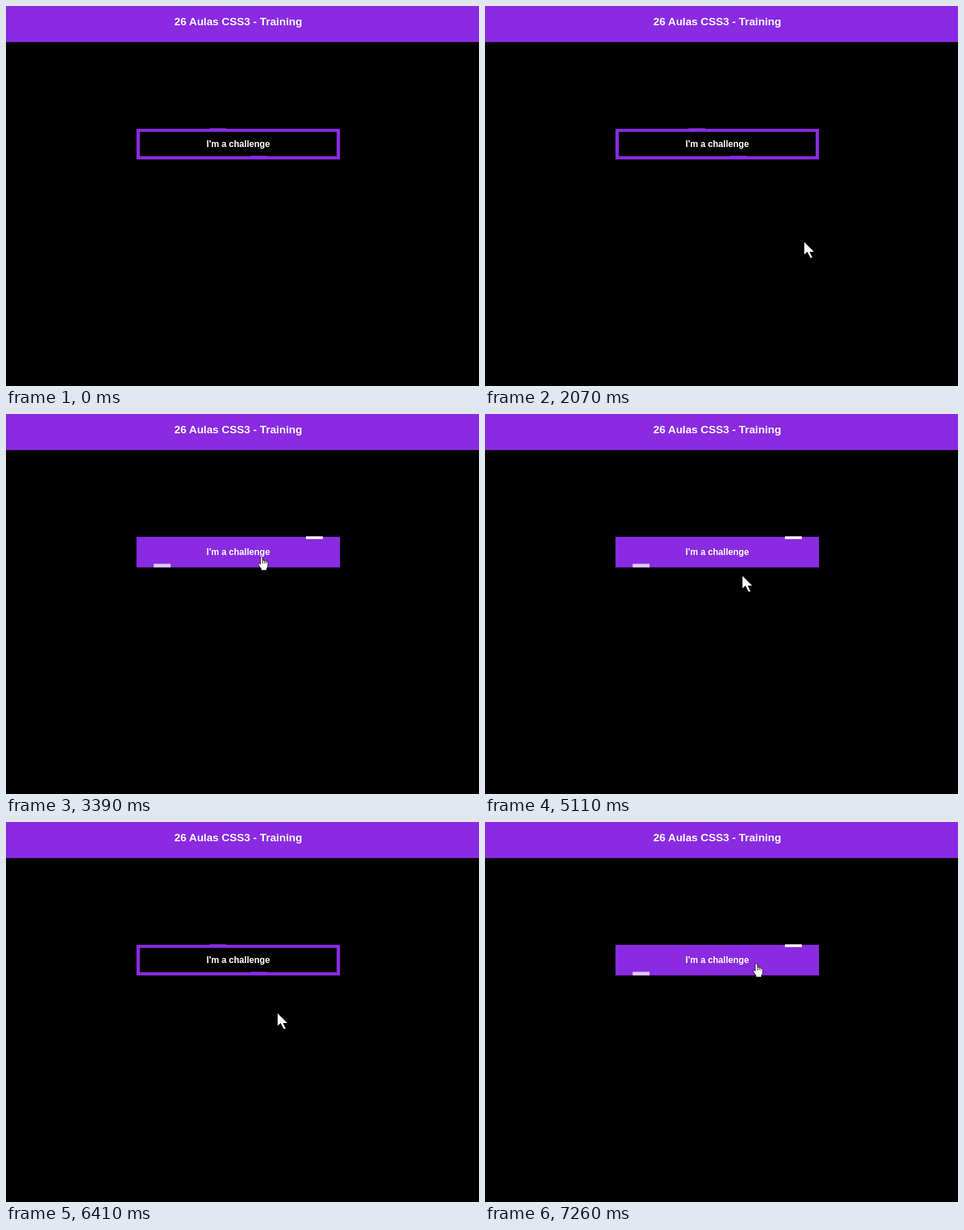
Write an HTML page that moves like this. It is 834 px wide and 671 px high and loops after 8000 ms.

```html
<!DOCTYPE html>
<html lang="pt">
<head>
<meta charset="utf-8">
<title>Button hover</title>
<style>
  html, body { margin: 0; width: 100%; height: 100%; overflow: hidden; background: #000; }
  svg { display: block; }
  text { font: bold 15.7px "Liberation Sans", Arial, sans-serif; fill: #fff; text-anchor: middle; }
  .title { font-size: 19.2px; }
</style>
</head>
<body>
<svg width="834" height="671">
  <rect width="834" height="63.7" fill="#8a2be2"/>
  <text class="title" x="409.5" y="34">26 Aulas CSS3 - Training</text>

  <rect x="230.1" y="216.9" width="358.8" height="54" fill="#8a2be2"/>
  <rect id="face" x="236" y="222.3" width="347" height="43"/>
  <rect id="topBar" y="216" width="29.7" height="4.8"/>
  <rect id="bottomBar" y="264.5" width="29.7" height="6.4"/>
  <text x="409.5" y="249">I'm a challenge</text>

  <g id="cursor">
    <path id="arrow" fill="#fff" d="M0 0V21.7L5.2 17L10.8 27.4H14.2L9.2 17H17Z"/>
    <g id="hand" stroke="#000">
      <path fill="#fff" d="M-2 1Q0-1.5 2 1V6Q4 4.8 5 6.8Q7 5.6 8 7.6Q11 7.2 11.3 10V16.5L9 21V23.5H-.5V21.2L-5.5 13.5Q-6-.5-5.5 11Q-3.5 10.5-2 13Z"/>
      <path fill="none" d="M2 6V11.5M5 7V11.5M8 8V11.5"/>
    </g>
  </g>
</svg>
<script>
const LOOP = 8000, STEP = 76.6;
const BAR_MS = 400, FACE_MS = 200;
const VIOLET = [138, 43, 226], WHITE = [255, 255, 255], LILAC = [225, 197, 250], BLACK = [0, 0, 0];

// Motion is sampled in even steps counted from the start of each burst.
const bursts = [0, 1380, 2470, 5110, 6100];
const hovers = [[2982, 5110], [6825, LOOP]];

// Pointer tip: time, x, y
const trail = [
  [1380, 680, 606], [1650, 608, 474], [1880, 572, 425], [2069, 563, 417],
  [2394, 563, 417], [2700, 505, 345], [2982, 456, 270], [3083, 450.5, 252.5],
  [5109, 450.5, 252.5], [5110, 454, 286], [5263, 476, 406], [5340, 479, 422],
  [6024, 479, 422], [6406, 479, 338], [6825, 479, 270], [6866, 479, 259], [7249, 478.4, 250.4]
];

const el = id => document.getElementById(id);
const face = el('face'), topBar = el('topBar'), bottomBar = el('bottomBar');
const cursor = el('cursor'), arrow = el('arrow'), hand = el('hand');
hand.firstElementChild.setAttribute('d',
  'M-2 1Q0-1.5 2 1V6Q4 4.8 5 6.8Q7 5.6 8 7.6Q11 7.2 11.3 10V16.5L9 21V23.5H-.5V21.2L-5.5 13.5Q-6 10.5-3.8 11L-2 13Z');

const clamp = v => Math.min(1, Math.max(0, v));
const mix = (a, b, p) => a + (b - a) * p;
const blend = (a, b, p) => `rgb(${a.map((v, i) => Math.round(mix(v, b[i], p)))})`;
const show = (node, on) => node.setAttribute('visibility', on ? 'visible' : 'hidden');

// cubic-bezier(.25, .1, .25, 1)
function ease(x) {
  const curve = (a, b, s) => 3 * a * s * (1 - s) ** 2 + 3 * b * s * s * (1 - s) + s ** 3;
  let lo = 0, hi = 1;
  for (let i = 0; i < 20; i++) {
    const mid = (lo + hi) / 2;
    if (curve(.25, .25, mid) < x) lo = mid; else hi = mid;
  }
  return curve(.1, 1, hi);
}

function sampled(t) {
  const start = bursts.findLast(b => b <= t);
  return start + Math.floor((t - start + 5) / STEP) * STEP;
}

// How far a transition of the given length is into the hover state.
function hoverAmount(t, duration, timing = p => p) {
  const [enter, leave] = hovers.findLast(h => h[0] <= t) || [LOOP, LOOP];
  return t > leave ? 1 - timing(clamp((t - leave) / duration))
                   : timing(clamp((t - enter) / duration));
}

function tipAt(t) {
  const next = trail.findIndex(k => k[0] > t);
  if (next < 1) return trail[next ? trail.length - 1 : 0].slice(1);
  const a = trail[next - 1], b = trail[next], p = (t - a[0]) / (b[0] - a[0]);
  return [mix(a[1], b[1], p), mix(a[2], b[2], p)];
}

function placeBar(bar, from, to, color, p) {
  bar.setAttribute('x', mix(from, to, p));
  bar.setAttribute('fill', blend(VIOLET, color, p));
}

function draw(now) {
  const t = sampled(now % LOOP);
  const bars = hoverAmount(t, BAR_MS);
  face.setAttribute('fill', blend(BLACK, VIOLET, hoverAmount(t, FACE_MS, ease)));
  placeBar(topBar, 358.9, 528.9, WHITE, bars);
  placeBar(bottomBar, 431, 260.4, LILAC, bars);

  const hovering = hovers.some(([enter, leave]) => t >= enter && t < leave);
  const visible = t >= trail[0][0];
  cursor.setAttribute('transform', `translate(${tipAt(t)})`);
  show(arrow, visible && !hovering);
  show(hand, visible && hovering);
  requestAnimationFrame(frame);
}

let origin;
function frame(now) {
  origin ??= now;
  draw(now - origin);
}
draw(0);
</script>
</body>
</html>
```
